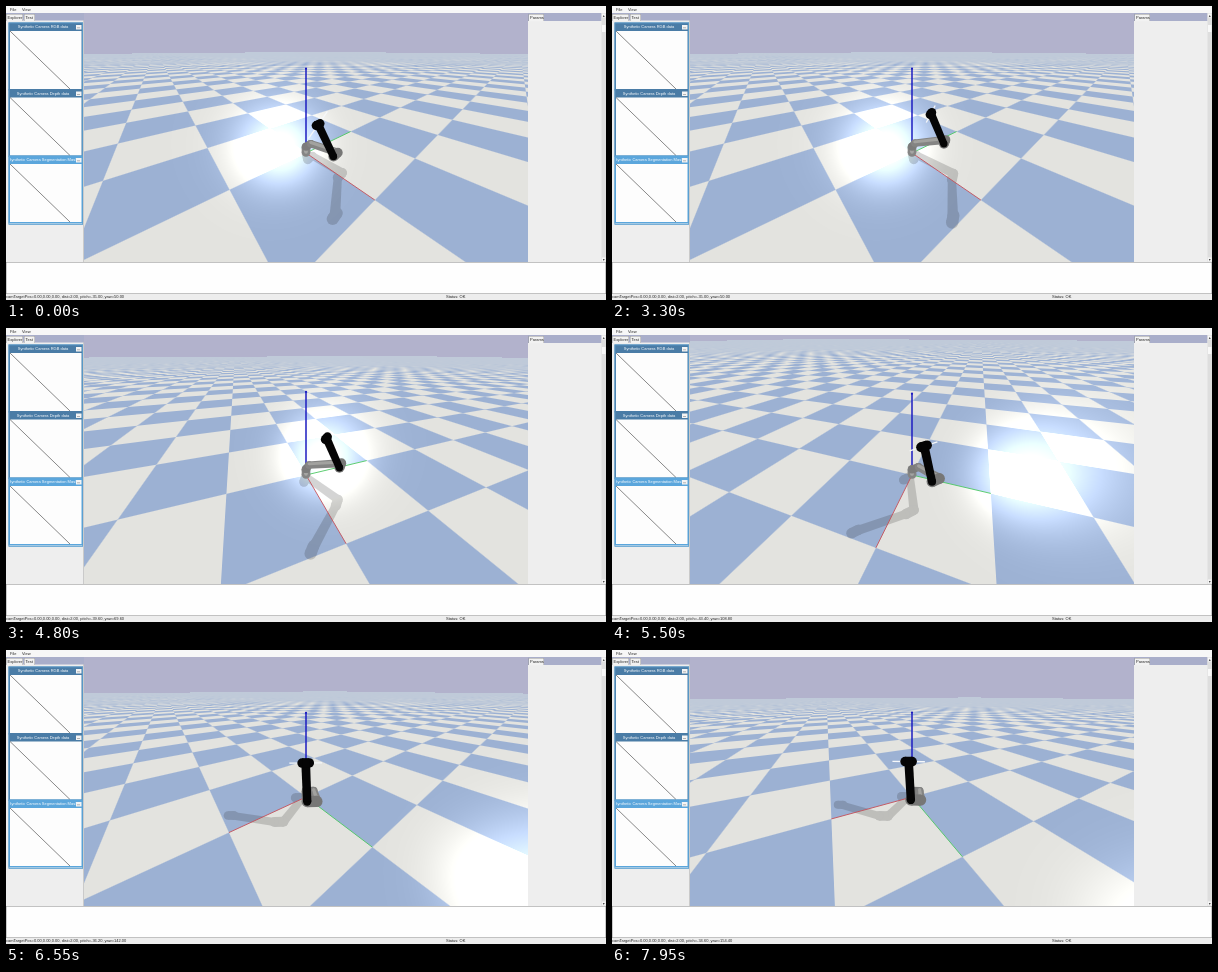
An HTML page with a canvas that plays this animation: 600 px wide and 294 px high, repeating every 8 s.

```html
<!DOCTYPE html>
<html lang="en">
<head>
<meta charset="utf-8">
<title>Robot arm simulation</title>
<style>
html, body { margin: 0; width: 100%; height: 100%; overflow: hidden; background: #eee; }
canvas { display: block; width: 600px; height: 294px; }
</style>
</head>
<body>
<canvas id="stage" width="600" height="294"></canvas>
<script>
const LOOP = 8000, HOLD = 500, STEP = 50;
const CX = 300, CY = 147, FOCAL = 147;
const VIEW = { x: 78, y: 7, w: 444, h: 249 };
const LIGHT = [-1.25, 0.75];
const GLOW = [-1.4, 0.75, 1];
const WHITE = [227, 227, 223], BLUE = [156, 177, 211], SKY = [178, 178, 204];

// time, pitch, yaw
const CAMERA = [
  [0, 35, 50], [3850, 35, 50], [4200, 35.6, 51.6], [4500, 37.4, 56.6], [4700, 39, 64],
  [5500, 43.4, 108.8], [6300, 37.8, 139], [6400, 37.8, 139], [6550, 36.2, 142],
  [7250, 34.6, 150.4], [7950, 34.6, 154.4]
];
// time, elbow xyz, wrist xyz, tool lift
const ARM = [
  [500, .41, .07, .14, .235, -.03, .505, .1],
  [1650, .42, .135, .19, .225, .014, .55, .08],
  [3300, .36, .19, .24, .21, .09, .59, .04],
  [4500, .3, .3, .25, .2, .14, .6, 0],
  [5500, .28, .32, .25, .18, .185, .6, 0],
  [6550, .25, .34, .25, .16, .2, .6, 0],
  [7950, .19, .37, .25, .14, .215, .6, 0]
];

const stage = document.getElementById('stage');
const ctx = stage.getContext('2d');
const shade = document.createElement('canvas');
shade.width = 600;
shade.height = 294;
const shadeCtx = shade.getContext('2d');
const pixels = ctx.createImageData(VIEW.w, VIEW.h);

function sample(table, t) {
  let i = 1;
  while (i < table.length - 1 && table[i][0] < t) i++;
  const a = table[i - 1], b = table[i];
  const k = Math.min(1, Math.max(0, (t - a[0]) / (b[0] - a[0])));
  return a.slice(1).map((v, j) => v + (b[j + 1] - v) * k);
}

function makeCamera(pitch, yaw) {
  const p = pitch * Math.PI / 180, y = yaw * Math.PI / 180;
  return {
    pitch, yaw, sin: Math.sin(p), cos: Math.cos(p), dist: 2,
    right: [Math.cos(y), Math.sin(y)], ahead: [-Math.sin(y), Math.cos(y)]
  };
}

function project(cam, [x, y, z]) {
  const r = x * cam.right[0] + y * cam.right[1];
  const f = x * cam.ahead[0] + y * cam.ahead[1];
  const scale = FOCAL / (cam.dist + f * cam.cos - z * cam.sin);
  return { x: CX + r * scale, y: CY - (f * cam.sin + z * cam.cos) * scale, scale };
}

// Average of a +1/-1 square wave over a window of width w.
function wave(p, w) {
  const tri = q => Math.abs(q / 2 - Math.floor(q / 2) - 0.5);
  return 2 * (tri(p - w / 2) - tri(p + w / 2)) / w;
}

function drawFloor(cam) {
  const { sin, cos, right, ahead } = cam;
  const height = cam.dist * sin, back = -cam.dist * cos;
  const glowLen = Math.hypot(...GLOW);
  const data = pixels.data;
  let i = 0;
  for (let py = 0; py < VIEW.h; py++) {
    const sy = (CY - (py + VIEW.y + 0.5)) / FOCAL;
    const dz = -sin + sy * cos, df = cos + sy * sin;
    const t = height / -dz, f = back + t * df;
    const along = height / (dz * dz) / FOCAL, across = t / FOCAL;
    for (let px = 0; px < VIEW.w; px++, i += 4) {
      const sx = (px + VIEW.x + 0.5 - CX) / FOCAL;
      const x = f * ahead[0] + t * sx * right[0];
      const y = f * ahead[1] + t * sx * right[1];
      data[i + 3] = 255;
      if (dz > -0.004 || Math.abs(x) > 100 || Math.abs(y) > 100) {
        for (let c = 0; c < 3; c++) data[i + c] = SKY[c];
        continue;
      }
      const skew = sx * cos;
      const wx = along * Math.abs(ahead[0] + skew * right[0]) + across * Math.abs(right[0]);
      const wy = along * Math.abs(ahead[1] + skew * right[1]) + across * Math.abs(right[1]);
      const mix = 0.5 + 0.5 * wave(x, wx * 0.9) * wave(y, wy * 0.9);
      // Mirror the view ray in the floor and compare it with the light.
      const dx = df * ahead[0] + sx * right[0], dy = df * ahead[1] + sx * right[1];
      const facing = (dx * GLOW[0] + dy * GLOW[1] - dz * GLOW[2]) /
        (glowLen * Math.sqrt(dx * dx + dy * dy + dz * dz));
      const shine = facing > 0.7 ? 115 * Math.pow(facing, 32) : 0;
      for (let c = 0; c < 3; c++) data[i + c] = BLUE[c] + (WHITE[c] - BLUE[c]) * mix + shine;
    }
  }
  ctx.putImageData(pixels, VIEW.x, VIEW.y);
}

function line(c, a, b, color, width) {
  c.strokeStyle = color;
  c.lineWidth = width;
  c.beginPath();
  c.moveTo(a.x, a.y);
  c.lineTo(b.x, b.y);
  c.stroke();
}

function disc(c, p, radius, color) {
  c.fillStyle = color;
  c.beginPath();
  c.arc(p.x, p.y, radius, 0, 2 * Math.PI);
  c.fill();
}

// Tapered link between two points in space.
function link(c, cam, from, to, radius, color) {
  const a = project(cam, from), b = project(cam, to);
  const ra = radius * a.scale, rb = radius * b.scale;
  const angle = Math.atan2(b.y - a.y, b.x - a.x) + Math.PI / 2;
  const nx = Math.cos(angle), ny = Math.sin(angle);
  disc(c, a, ra, color);
  disc(c, b, rb, color);
  c.beginPath();
  c.moveTo(a.x + nx * ra, a.y + ny * ra);
  c.lineTo(b.x + nx * rb, b.y + ny * rb);
  c.lineTo(b.x - nx * rb, b.y - ny * rb);
  c.lineTo(a.x - nx * ra, a.y - ny * ra);
  c.fill();
}

function pose(t) {
  const [ex, ey, ez, wx, wy, wz, lift] = sample(ARM, t);
  const len = Math.hypot(ex, ey), side = [-ey / len, ex / len];
  const shift = (p, d, up = 0) => [p[0] + side[0] * d, p[1] + side[1] * d, p[2] + up];
  const base = [0, 0, 0.1], elbow = [ex, ey, ez], wrist = [wx, wy, wz];
  return {
    base, elbow, wrist,
    shoulder: shift(base, 0.1), joint: shift(elbow, 0.1),
    palm: [shift(wrist, -0.035), shift(wrist, 0.035)],
    tool: [shift(wrist, -0.16, -lift), shift(wrist, 0.16, lift)]
  };
}

function drawShadow(cam, arm) {
  const drop = p => [p[0] - LIGHT[0] * p[2], p[1] - LIGHT[1] * p[2], 0];
  const cast = (a, b, r) => link(shadeCtx, cam, drop(a), drop(b), r, '#222');
  shadeCtx.clearRect(0, 0, 600, 294);
  cast([0, 0, 0], arm.base, 0.06);
  cast(arm.base, arm.shoulder, 0.055);
  cast(arm.shoulder, arm.joint, 0.05);
  cast(arm.joint, arm.elbow, 0.055);
  cast(arm.elbow, arm.wrist, 0.045);
  cast(...arm.palm, 0.05);
  ctx.globalAlpha = 0.19;
  ctx.drawImage(shade, 0, 0);
  ctx.globalAlpha = 1;
}

function drawAxes(cam) {
  const o = project(cam, [0, 0, 0]), top = project(cam, [0, 0, 1]);
  line(ctx, o, project(cam, [1, 0, 0]), '#c4505a', 0.9);
  line(ctx, o, project(cam, [0, 1, 0]), '#4cc862', 0.9);
  line(ctx, o, top, '#1c1cc0', 1.5);
  disc(ctx, top, 1.1, '#1c1cc0');
}

function drawArm(cam, arm) {
  const part = (a, b, r, color) => link(ctx, cam, a, b, r, color);
  part([0, 0, 0.01], arm.base, 0.058, '#858584');
  part([0, 0, 0.02], [-0.02, 0, 0.1], 0.025, '#a5a5a3');
  part(arm.base, arm.shoulder, 0.052, '#7c7c7b');
  part(arm.shoulder, arm.joint, 0.05, '#848483');
  const raise = p => [p[0], p[1], p[2] + 0.02];
  part(raise(arm.shoulder), raise(arm.joint), 0.02, '#a2a29f');
  part(arm.joint, arm.elbow, 0.058, '#777776');
  line(ctx, project(cam, arm.tool[0]), project(cam, arm.tool[1]), '#f6f8fa', 1.3);
  part(arm.elbow, arm.wrist, 0.043, '#050505');
  part(...arm.palm, 0.047, '#050505');
}

function box(x, y, w, h, color) {
  ctx.fillStyle = color;
  ctx.fillRect(x, y, w, h);
}

function label(text, x, y, color = '#222', align = 'left') {
  ctx.font = '4px "Liberation Sans", Arial, sans-serif';
  ctx.textAlign = align;
  ctx.textBaseline = 'middle';
  ctx.fillStyle = color;
  ctx.fillText(text, x, y);
}

function drawTab(text, x, w) {
  box(x, 8, w, 7, '#9a9a9a');
  box(x + 0.5, 8.5, w - 1, 7, '#f2f2f2');
  label(text, x + 1.5, 12);
}

function drawWindow(title, y, color) {
  box(2.5, y, 74.5, 68, color);
  box(4, y + 8.5, 71.5, 58, '#fdfdfd');
  line(ctx, { x: 4, y: y + 8.5 }, { x: 64, y: y + 66.5 }, '#555', 0.7);
  ctx.save();
  ctx.beginPath();
  ctx.rect(4, y, 65.5, 9);
  ctx.clip();
  label(title, 37, y + 4.8, '#fff', 'center');
  ctx.restore();
  box(70, y + 2.5, 5.5, 4.5, '#f4f4f4');
  box(71, y + 5, 3, 0.7, '#999');
}

function drawInterface(cam) {
  box(0, 0, 600, 7, '#f7f7f7');
  label('File', 4, 3.5);
  label('View', 16, 3.5);

  box(0, 7, 78, 249, '#eeeeee');
  box(0, 7, 78, 7.5, '#a9aeca');
  box(77.3, 14, 0.7, 242, '#bbb');
  drawTab('Explorer', 0, 17);
  drawTab('Test', 18, 11);
  drawWindow('Synthetic Camera RGB data', 16.5, '#4a7ca6');
  drawWindow('Synthetic Camera Depth data', 83, '#4a7ca6');
  drawWindow('Synthetic Camera Segmentation Mask', 149.5, '#5ba6dc');
  ctx.strokeStyle = '#5a9fd0';
  ctx.lineWidth = 0.8;
  ctx.strokeRect(2.9, 16.9, 73.7, 201.5);

  box(522, 7, 78, 249, '#eeeeee');
  box(522, 7, 73.5, 8, '#a9aeca');
  drawTab('Params', 522.5, 15.5);
  box(595.5, 7, 4.5, 249, '#dedede');
  box(596, 7.5, 3.5, 4, '#f8f8f8');
  box(596, 19, 3.5, 7, '#f8f8f8');
  box(596, 251.5, 3.5, 4, '#f8f8f8');
  label('▴', 597.7, 9.5, '#444', 'center');
  label('▾', 597.7, 253.5, '#444', 'center');

  box(0, 256, 600, 32, '#999');
  box(0.5, 256.6, 599, 30.8, '#fefefe');
  box(0, 288, 600, 6, '#ededed');
  label(`camTargetPos=0.00,0.00,0.00, dist=2.00, pitch=-${cam.pitch.toFixed(2)}, yaw=${cam.yaw.toFixed(2)}`, 0, 290.6);
  label('Status: OK', 440, 290.6);
}

function draw(t) {
  const [pitch, yaw] = sample(CAMERA, t).map(v => Math.round(v * 5) / 5);
  const cam = makeCamera(pitch, yaw), arm = pose(t);
  drawFloor(cam);
  drawShadow(cam, arm);
  drawAxes(cam);
  drawArm(cam, arm);
  drawInterface(cam);
}

const start = performance.now();
let shown = -1;
function tick() {
  const t = (performance.now() - start) % LOOP;
  const step = t < HOLD ? 0 : Math.floor(t / STEP) * STEP;
  if (step !== shown) draw(shown = step);
  requestAnimationFrame(tick);
}
tick();
</script>
</body>
</html>
```
